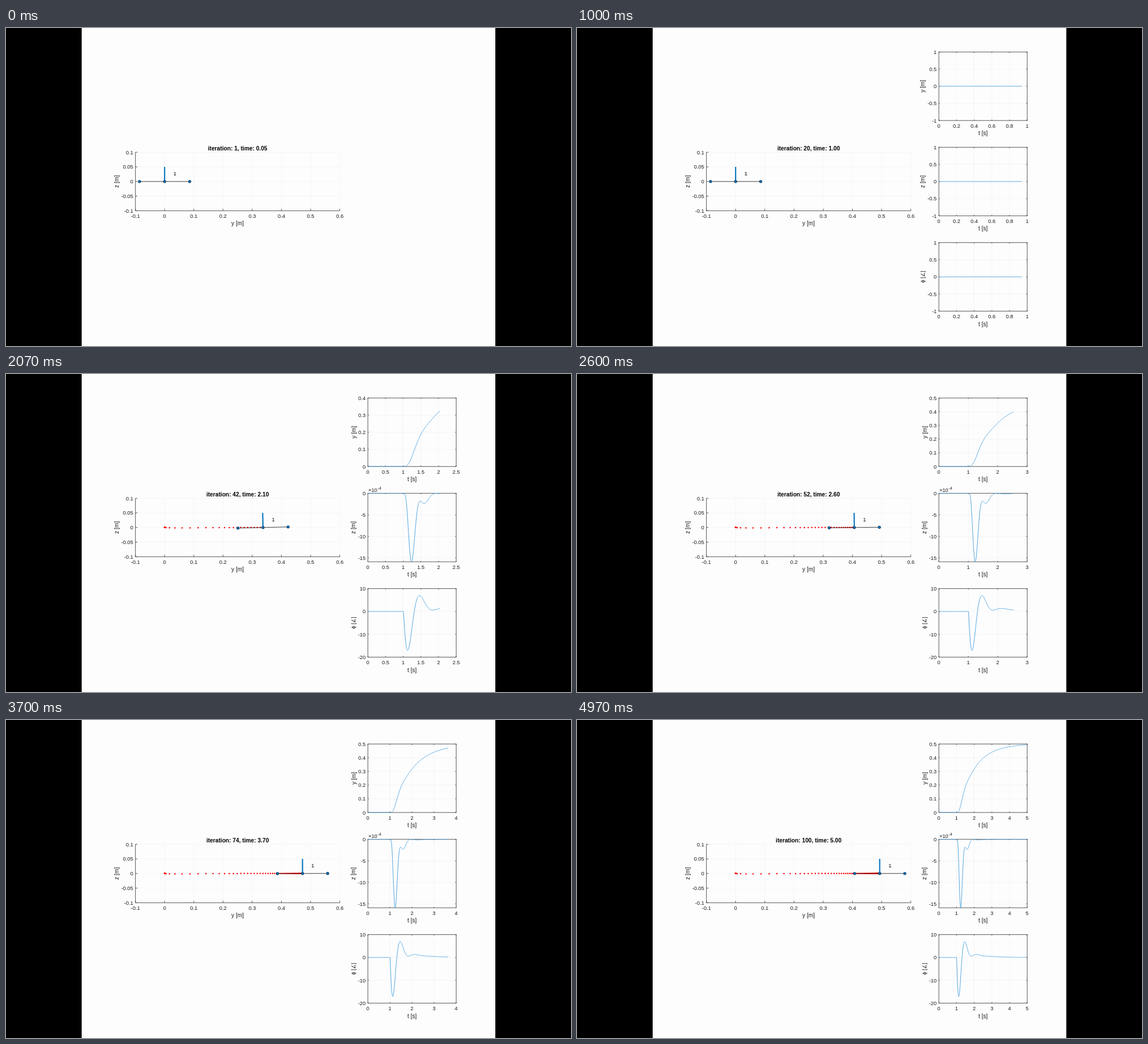
An HTML page with a canvas for the animation above (5000 ms loop, 998 by 561 pixels).

```html
<!DOCTYPE html>
<html lang="en">
<head>
<meta charset="utf-8">
<title>Planar quadrotor step response</title>
<style>
html, body { margin: 0; width: 100%; height: 100%; overflow: hidden; background: #000; }
canvas { display: block; }
</style>
</head>
<body>
<canvas id="stage" width="998" height="561"></canvas>
<script>
const ctx = document.getElementById('stage').getContext('2d');
const LOOP = 5000, STEP = 0.05, LAG = 0.06, ARM = 0.086;
const INK = '#262626', TEXT = '#1a1a1a', BLUE = '#0072bd', CURVE = '#45a0dc';
const SANS = '"Liberation Sans", Arial, sans-serif';
const TICK_FONT = '9.3px ' + SANS, LABEL_FONT = '10.2px ' + SANS;

// Planar quadrotor with a cascaded PD controller; the goal jumps to y = 0.5 at t = 1.
const RATE = 200;

function simulate(duration) {
  const g = 9.81, substeps = 20, dt = 1 / (RATE * substeps), log = [];
  let y = 0, z = 0, phi = 0, vy = 0, vz = 0, spin = 0;
  for (let i = 0; i <= duration * RATE; i++) {
    log.push({ y, z, phi });
    const goal = i >= RATE ? 0.5 : 0;
    for (let k = 0; k < substeps; k++) {
      const thrust = g - 200 * z - 20 * vz;
      const wanted = -(10 * (goal - y) - 10 * vy) / g;
      spin += (1000 * (wanted - phi) - 100 * spin) * dt;
      vy -= thrust * Math.sin(phi) * dt;
      vz += (thrust * Math.cos(phi) - g) * dt;
      phi += spin * dt;
      y += vy * dt;
      z += vz * dt;
    }
  }
  return log;
}

const flight = simulate(5);
const stateAt = t => flight[Math.round(t * RATE)];

function text(str, x, y, { font = TICK_FONT, align = 'center', color = TEXT, turn = 0 } = {}) {
  ctx.save();
  ctx.translate(x, y);
  ctx.rotate(turn);
  ctx.font = font;
  ctx.textAlign = align;
  ctx.fillStyle = color;
  ctx.fillText(str, 0, 0);
  ctx.restore();
}

function line(x1, y1, x2, y2, color, width) {
  ctx.strokeStyle = color;
  ctx.lineWidth = width;
  ctx.beginPath();
  ctx.moveTo(x1, y1);
  ctx.lineTo(x2, y2);
  ctx.stroke();
}

function disc(x, y, r, color) {
  ctx.fillStyle = color;
  ctx.beginPath();
  ctx.arc(x, y, r, 0, 2 * Math.PI);
  ctx.fill();
}

function niceStep(range, most) {
  for (let p = Math.floor(Math.log10(range)) - 1; ; p++) {
    for (const m of [1, 2, 5]) {
      const step = m * 10 ** p;
      if (range / step <= most + 1e-6) return step;
    }
  }
}

// Round limits out to ticks, unless that leaves too much empty room.
function limits(lo, hi) {
  const range = hi - lo;
  if (range === 0) return [-1, 1];
  const step = niceStep(range, 5);
  const low = Math.floor(lo / step + 1e-6) * step;
  const high = Math.ceil(hi / step - 1e-6) * step;
  return [lo - low > range / 4 ? lo : low, high - hi > range / 4 ? hi : high];
}

function ticks([lo, hi], most = 5.6) {
  const step = niceStep(hi - lo, most), list = [];
  for (let i = Math.ceil(lo / step - 1e-6); i * step <= hi + step * 1e-6; i++) list.push(i * step);
  return list;
}

const tidy = v => String(+v.toFixed(6) || 0);

function drawAxes({ x, y, w, h, xlim, ylim, most, boxed, tick, power = 0, xlabel, ylabel, yfont = LABEL_FONT }) {
  const px = v => x + (v - xlim[0]) / (xlim[1] - xlim[0]) * w;
  const py = v => y + h - (v - ylim[0]) / (ylim[1] - ylim[0]) * h;
  const grid = 'rgba(38,38,38,0.035)', axis = 0.75;
  const bottom = y + h, right = x + w;
  let widest = 0;
  ctx.font = TICK_FONT;

  for (const v of ticks(xlim, most)) {
    line(px(v), y, px(v), bottom, grid, 1);
    line(px(v), bottom, px(v), bottom - tick, INK, axis);
    if (boxed) line(px(v), y, px(v), y + tick, INK, axis);
    text(tidy(v), px(v), bottom + 12.9);
  }
  for (const v of ticks(ylim)) {
    const label = tidy(v / 10 ** power);
    line(x, py(v), right, py(v), grid, 1);
    line(x, py(v), x + tick, py(v), INK, axis);
    if (boxed) line(right, py(v), right - tick, py(v), INK, axis);
    text(label, x - 4, py(v) + 3.4, { align: 'right' });
    widest = Math.max(widest, ctx.measureText(label).width);
  }
  if (boxed) {
    ctx.strokeStyle = INK;
    ctx.lineWidth = axis;
    ctx.strokeRect(x, y, w, h);
  } else {
    line(x, y, x, bottom, INK, axis);
    line(x, bottom, right, bottom, INK, axis);
  }
  if (power) {
    text('×10', x + 0.8, y - 2.9, { align: 'left' });
    text(String(power), x + 17, y - 6.1, { align: 'left', font: '7.4px ' + SANS });
  }
  text(xlabel, x + w / 2, bottom + 26, { font: LABEL_FONT });
  text(ylabel, x - widest - 8.7, y + h / 2, { font: yfont, turn: -Math.PI / 2 });
  return { px, py };
}

const plots = [
  { top: 42.3, value: s => s.y, ylabel: 'y [m]' },
  { top: 210.4, value: s => s.z, ylabel: 'z [m]' },
  { top: 378.6, value: s => s.phi * 180 / Math.PI, ylabel: 'ϕ [∠]',
    yfont: '9.2px "Liberation Sans", "DejaVu Sans", sans-serif' }
];

function drawPlot({ top, value, ylabel, yfont }, end) {
  const values = flight.slice(0, Math.round(end * RATE) + 1).map(value);
  const hi = Math.max(...values), lo = Math.min(...values);
  const xlim = limits(0, end), ylim = limits(lo, hi);
  let power = Math.floor(Math.log10(Math.max(-ylim[0], ylim[1])) + 1e-9);
  if (power > -3) power = 0;
  else if (lo < 0 && hi > 0) power = -4;

  const { px, py } = drawAxes({
    x: 639.2, y: top, w: 156, h: 120.9, xlim, ylim,
    boxed: true, tick: 1.7, power, xlabel: 't [s]', ylabel, yfont
  });
  ctx.strokeStyle = CURVE;
  ctx.lineWidth = 0.95;
  ctx.lineJoin = 'round';
  ctx.beginPath();
  values.forEach((v, i) => ctx.lineTo(px(i / RATE), py(v)));
  ctx.stroke();
}

function drawScene(iter) {
  const time = iter * STEP;
  const { px, py } = drawAxes({
    x: 228.6, y: 219.2, w: 361, h: 103.2, xlim: [-0.1, 0.6], ylim: [-0.1, 0.1], most: 7,
    boxed: false, tick: 3.6, xlabel: 'y [m]', ylabel: 'z [m]'
  });
  text(`iteration: ${iter}, time: ${time.toFixed(2)}`, 409.1, 215.5, { font: 'bold ' + LABEL_FONT, color: '#000' });

  for (let i = 1; i < iter; i++) {
    const past = stateAt(i * STEP);
    disc(px(past.y), py(past.z), 1.25, '#f00');
  }

  const { y, z, phi } = stateAt(time);
  const c = Math.cos(phi), s = Math.sin(phi);
  const ends = [-ARM, 0, ARM].map(d => [px(y + d * c), py(z + d * s)]);
  line(...ends[0], ...ends[2], '#111', 0.8);
  line(...ends[1], px(y - 0.05 * s), py(z + 0.05 * c), BLUE, 2.1);
  for (const [ex, ey] of ends) {
    disc(ex, ey, 2.6, '#0b2c44');
    disc(ex, ey, 1.9, BLUE);
  }
  text('1', px(y + 0.03), 260.2, { align: 'left', color: '#000' });
}

function draw(ms) {
  // 30 pictures a second on a 10 ms clock; the simulation shows 20 steps a second.
  const frame = Math.floor((Math.floor(ms / 10) * 10 + 3.4) * 0.03);
  const iter = Math.max(1, Math.ceil(frame * 2 / 3 - 1e-6));
  ctx.fillStyle = '#000';
  ctx.fillRect(0, 0, 998, 561);
  ctx.fillStyle = '#fdfdfe';
  ctx.fillRect(133.7, 0, 730.6, 561);
  drawScene(iter);
  if (iter > 1) plots.forEach(p => drawPlot(p, iter * STEP - LAG));
}

function loop() {
  draw(performance.now() % LOOP);
  requestAnimationFrame(loop);
}
loop();
</script>
</body>
</html>
```
